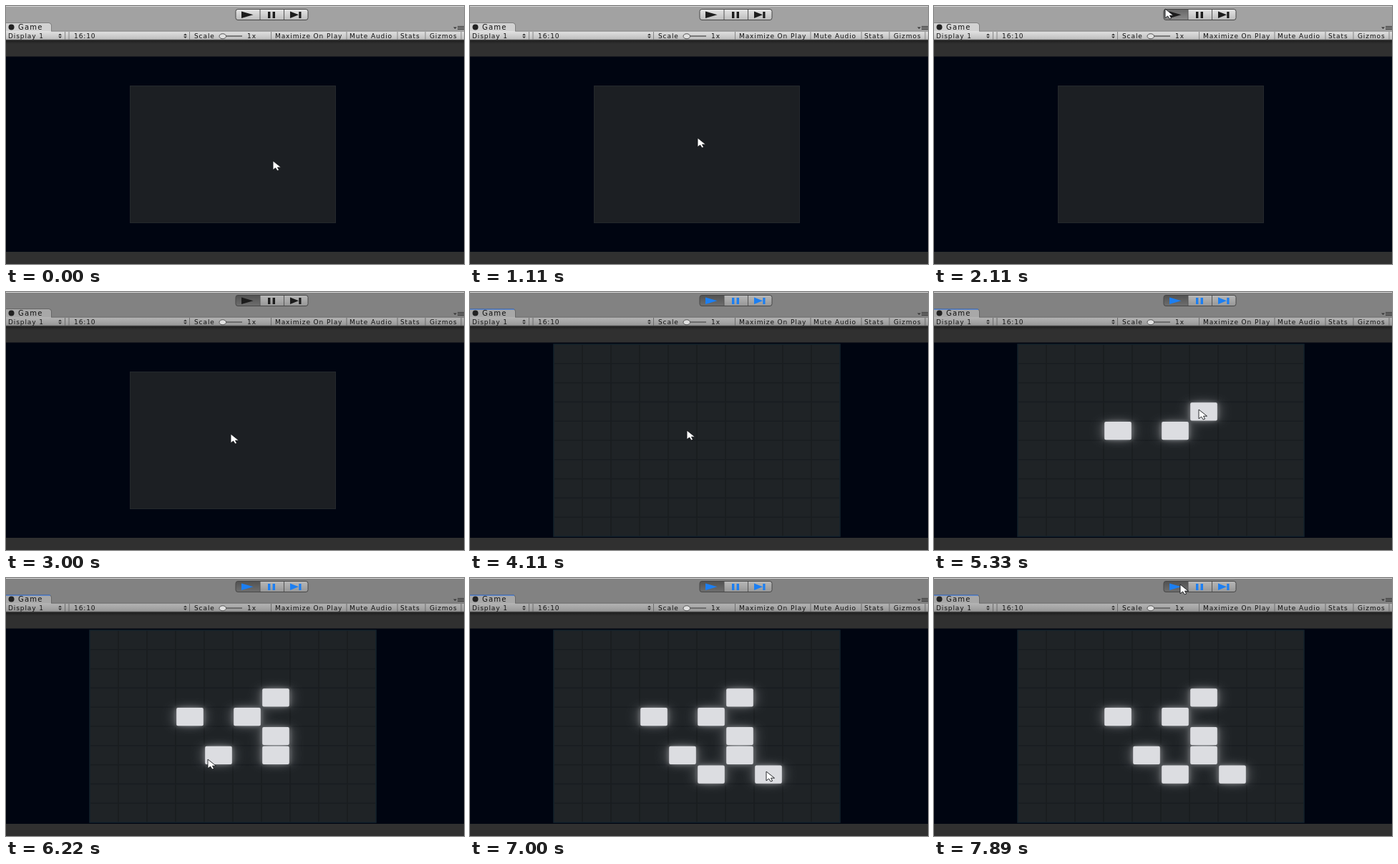
Write an HTML page that moves like this. It is 640 px wide and 360 px high and loops after 8 s.

```html
<!DOCTYPE html>
<html lang="en">
<head>
<meta charset="utf-8">
<title>Game view</title>
<style>
html, body { margin: 0; width: 100%; height: 100%; overflow: hidden; background: #303030; }
svg { display: block; width: 100vw; height: 100vh; }
text { font: 9px "DejaVu Sans", sans-serif; letter-spacing: .9px; fill: #111; }
.tab { font-size: 10px; letter-spacing: 1.2px; }
#icons { fill: #1c1c1c; }
#icons.on { fill: #1c7ff2; }
</style>
</head>
<body>
<svg viewBox="0 0 640 360" preserveAspectRatio="none">
  <defs>
    <linearGradient id="row" x2="0" y2="1"><stop stop-color="#e2e2e2"/><stop offset="1" stop-color="#bdbdbd"/></linearGradient>
    <linearGradient id="btn" x2="0" y2="1"><stop stop-color="#e6e6e6"/><stop offset="1" stop-color="#bcbcbc"/></linearGradient>
    <linearGradient id="down" x2="0" y2="1"><stop stop-color="#666"/><stop offset="1" stop-color="#8a8a8a"/></linearGradient>
    <linearGradient id="shade" x2="0" y2="1"><stop stop-color="#1c1c1c"/><stop offset="1" stop-color="#303030"/></linearGradient>
    <filter id="glow" filterUnits="userSpaceOnUse" x="117" y="73" width="400" height="268">
      <feGaussianBlur stdDeviation="10 7" result="wide"/>
      <feComponentTransfer in="wide" result="halo"><feFuncA type="linear" slope=".42"/></feComponentTransfer>
      <feGaussianBlur in="SourceGraphic" stdDeviation="3.5 2.4" result="near"/>
      <feComponentTransfer in="near" result="rim"><feFuncA type="linear" slope=".45"/></feComponentTransfer>
      <feMerge><feMergeNode in="halo"/><feMergeNode in="rim"/><feMergeNode in="SourceGraphic"/></feMerge>
    </filter>
  </defs>

  <rect width="640" height="360" fill="#303030"/>
  <rect y="47" width="640" height="6" fill="url(#shade)"/>
  <rect y="70.5" width="640" height="272.5" fill="#000511"/>
  <rect id="panel" x="173.5" y="111.5" width="287" height="191" fill="#1c1f23" stroke="#24282c"/>
  <g id="board">
    <rect x="117" y="73" width="400" height="268" fill="#1f2326"/>
    <path id="lines" stroke="#191d20" stroke-width="1.6"/>
    <rect x="117" y="73" width="400" height="268" fill="none" stroke="#15232d" stroke-width="1.5"/>
    <g id="cells" fill="#dcdde1" filter="url(#glow)"></g>
  </g>

  <rect width="640" height="36" fill="#a2a2a2"/>
  <rect width="640" height="1" fill="#d6d6d6"/>
  <path d="M0 36V24H60Q63 24 63 27V36Z" fill="#d2d2d2"/>
  <path d="M0 23.5H60Q63.5 24 63.5 27V35" fill="none" stroke="#808080"/>
  <rect y="35" width="640" height="12" fill="url(#row)"/>
  <path d="M63 35.2H640M0 47H640" stroke="#777" stroke-width=".8"/>
  <g id="seps" stroke="#858585"></g>

  <rect x="321" y="4.5" width="101" height="15" rx="3" fill="url(#btn)"/>
  <path id="pressed" d="M355 4.5H324Q321 4.5 321 7.5V16.5Q321 19.5 324 19.5H355Z" fill="url(#down)"/>
  <rect id="tint" y="1" width="640" height="46" opacity=".2"/>
  <rect x="321" y="4.5" width="101" height="15" rx="3" fill="none" stroke="#474747"/>
  <path d="M355 5V19M388.5 5V19" stroke="#555"/>
  <rect id="focus" y="23.5" width="62" height="1.2" fill="#3f78d8"/>

  <g id="icons">
    <path d="M329 7.5l16.5 4.7L329 17z"/>
    <path d="M366 8h3.4v9H366zM372.6 8h3.4v9h-3.4z"/>
    <path d="M397 7.5l12 4.7L397 17zM409.3 8h3.2v9h-3.2z"/>
  </g>
  <circle cx="7.5" cy="29.5" r="4" fill="#222"/>
  <path d="M625 29.5h5l-2.5 2.5z" fill="#333"/>
  <path d="M631 28.5h9m-9 2h9m-9 2h9" stroke="#333"/>
  <path id="updown" d="M73 41l2.5-2.5L78 41zm0 1.5h5L75.5 45z" fill="#333"/>
  <use href="#updown" x="175"/>
  <path d="M306 42H330" stroke="#555" stroke-width="1.4"/>
  <ellipse cx="302.8" cy="42.2" rx="4.8" ry="3.5" fill="#e0e0e0" stroke="#555"/>
  <text class="tab" x="17" y="33">Game</text>
  <g id="labels"></g>

  <path id="cursor" d="M0 0V12.8L3.6 10L6.2 14L8.6 13.1L6.5 9.2H11.5Z" fill="#fff" stroke="#16181b" stroke-width=".9" stroke-linejoin="round"/>
</svg>
<script>
const LOOP = 8000, FPS = 9;
const PRESS = 19, TINT = 20, START = 36;
const W = 40, H = 26.8, X0 = 117, Y0 = 73;

// tick, tip x, tip y; straight moves between
const path = [
  [2, 373, 216], [7, 373, 212], [8, 373, 212], [11, 290, 170], [13, 219, 112],
  [16, 285, 42], [19, 323, 4], [21, 323, 4], [24, 314, 175], [25, 314, 175],
  [27, 314, 198], [35, 314, 198], [38, 298, 191], [41, 257, 193], [43, 257, 193],
  [46, 330, 190], [48, 370, 164], [50, 371, 212], [53, 373, 245], [55, 298, 249],
  [56, 282, 253], [57, 243, 272], [58, 287, 284], [60, 332, 274], [63, 414, 270],
  [65, 479, 120], [66, 432, 53], [68, 378, 15], [71, 344, 9]
];

// tick, column, row
const clicks = [
  [43, 3, 4], [46, 5, 4], [48, 6, 3], [51, 6, 5],
  [53, 6, 6], [55, 4, 6], [60, 5, 7], [63, 7, 7]
];

const labels = {
  "Display 1": 3, "16:10": 95, "Scale": 263, "1x": 337,
  "Maximize On Play": 376, "Mute Audio": 480, "Stats": 551, "Gizmos": 592
};

const $ = id => document.getElementById(id);
const add = (parent, tag, attrs) => {
  const el = document.createElementNS("http://www.w3.org/2000/svg", tag);
  for (const k in attrs) el.setAttribute(k, attrs[k]);
  return parent.appendChild(el);
};
const show = (el, on) => { el.style.display = on ? "" : "none"; };

for (const s in labels) add($("labels"), "text", { x: labels[s], y: 45 }).textContent = s;
for (const x of [82.5, 88, 256.5, 370.5, 476, 547, 586, 636]) {
  add($("seps"), "path", { d: `M${x} 36v11` });
}

let d = "";
for (let i = 1; i < 10; i++) {
  d += `M${X0 + i * W} ${Y0}v${10 * H}M${X0} ${Y0 + i * H}h${10 * W}`;
}
$("lines").setAttribute("d", d);

const cells = clicks.map(([, c, r]) => add($("cells"), "rect", {
  x: X0 + c * W + 1.2, y: Y0 + r * H + 0.9, width: W - 2.4, height: H - 1.6, rx: 2
}));

function tip(n) {
  const i = path.findIndex(p => p[0] >= n);
  if (i < 1) return path[0].slice(1);
  const [n0, x0, y0] = path[i - 1], [n1, x1, y1] = path[i];
  const k = (n - n0) / (n1 - n0);
  return [x0 + (x1 - x0) * k, y0 + (y1 - y0) * k].map(Math.round);
}

function draw(t) {
  const n = Math.min(71, Math.floor((t + 5) * FPS / 1000));
  const playing = n >= START;
  $("cursor").setAttribute("transform", `translate(${tip(n)})`);
  show($("pressed"), n >= PRESS);
  show($("tint"), n >= TINT);
  show($("panel"), !playing);
  show($("board"), playing);
  show($("focus"), playing);
  $("icons").classList.toggle("on", playing);
  cells.forEach((el, i) => show(el, n >= clicks[i][0]));
}

const begin = performance.now();
function tick() {
  draw((performance.now() - begin) % LOOP);
  requestAnimationFrame(tick);
}
tick();
</script>
</body>
</html>
```
